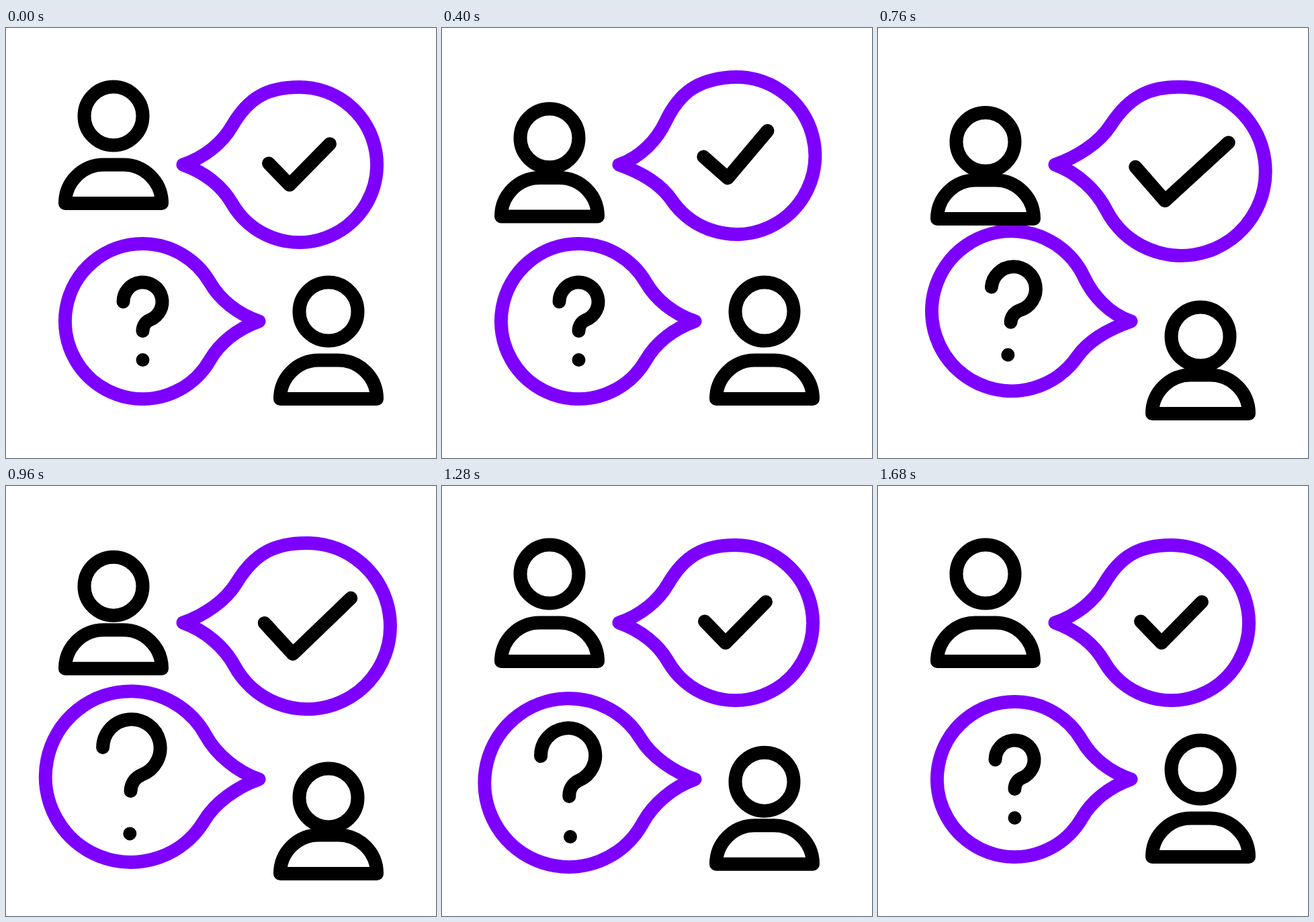
Recreate the animation shown at these times as an HTML page. Size 640 by 640 pixels, loop 1.72 s.

```html
<!DOCTYPE html>
<html lang="en">
<head>
<meta charset="utf-8">
<title>Question and answer</title>
<style>
  html, body { margin: 0; width: 100%; height: 100%; overflow: hidden; background: #fff; }
  svg { display: block; width: 100%; height: 100%; }
  path, circle { fill: none; stroke: #000; stroke-width: 20; stroke-linecap: round; stroke-linejoin: round; }
  .bubble { stroke: #7d00ff; }
</style>
</head>
<body>
<svg viewBox="0 0 640 640"></svg>
<script>
const LOOP = 1720, STEP = 40, LAG = 320;
const R = 115.5, REACH = 173;
const svg = document.querySelector('svg');

// Symmetric ease from 0 to 1 between two times.
function ramp(t, from, to) {
  const u = Math.min(1, Math.max(0, (t - from) / (to - from)));
  return u * u / (u * u + (1 - u) * (1 - u));
}

// The second speaker runs the same moves LAG ms later.
const nod = t => ramp(t, 60, 580) - ramp(t, 610, 1265);
const grow = t => ramp(t, 260, 730) - ramp(t, 795, 1290);
const tilt = t => -5 * ramp(t, 190, 476) + 8.3 * ramp(t, 476, 816) - 3.3 * ramp(t, 816, 1096);

function add(tag, attrs) {
  const el = document.createElementNS('http://www.w3.org/2000/svg', tag);
  for (const name in attrs) el.setAttribute(name, attrs[name]);
  return svg.appendChild(el);
}

// Teardrop outline: the tip stays put while the round part turns and grows.
function bubblePath(x, y, dir, scale, angle, shoulder) {
  const a = angle * Math.PI / 180, c = Math.cos(a) * scale, s = Math.sin(a) * scale;
  const at = (px, py) => `${(x + dir * px).toFixed(2)} ${(y + py).toFixed(2)} `;
  const p = (px, py) => at(px * c - py * s, px * s + py * c);
  const k = 41 * shoulder, r = R * scale;
  return 'M' + at(0, 0)
    + 'C' + at(33, -11.5) + p(58.5, -32.6) + p(73, -57.75)
    + 'C' + p(73 + k * .5, -57.75 - k * .866) + p(REACH - k, -R) + p(REACH, -R)
    + `A${r} ${r} 0 1 ${dir > 0 ? 1 : 0} ` + p(73, 57.75)
    + 'C' + p(58.5, 32.6) + at(33, 11.5) + at(0, 0) + 'Z';
}

function makeBubble(x, y, dir, amount, shoulder, markPath, lag) {
  const outline = add('path', { class: 'bubble' });
  const mark = add('path', { d: markPath });
  return t => {
    const g = grow(t - lag), angle = tilt(t - lag);
    const scale = 1 + amount * g, size = 1 + .5 * g;
    outline.setAttribute('d', bubblePath(x, y, dir, scale, angle, shoulder));
    mark.setAttribute('transform', `translate(${x} ${y}) rotate(${dir * angle}) `
      + `translate(${dir * REACH * scale} 0) scale(${size})`);
    mark.style.strokeWidth = 20 / size;
  };
}

function makePerson(x, y, lag) {
  const head = add('circle', { cx: x, r: 43.5 });
  const body = add('path', { d: 'M-72 0A57.5 57.5 0 0 1 -14.5 -57.5H14.5A57.5 57.5 0 0 1 72 0Z' });
  return t => {
    const n = nod(t - lag);
    head.setAttribute('cy', y + 42 * n);
    body.setAttribute('transform', `translate(${x} ${y + 130 + 25 * n})`);
  };
}

const parts = [
  makeBubble(263.5, 203.5, 1, .0865, 1.17, 'M-45.5 -2L-14.5 30L45.5 -31', 0),
  makeBubble(376.5, 436.5, -1, .107, 1,
    'M-29 -29A29 29 0 1 1 10.5 -2C4 1 0 7 0 14.5M0 57.5h.01', LAG),
  makePerson(160, 131, 0),
  makePerson(480, 422, LAG)
];

function draw(now) {
  const t = Math.floor(now % LOOP / STEP) * STEP;
  parts.forEach(update => update(t));
}

const start = performance.now();
function tick() {
  draw(performance.now() - start);
  requestAnimationFrame(tick);
}
tick();
</script>
</body>
</html>
```
